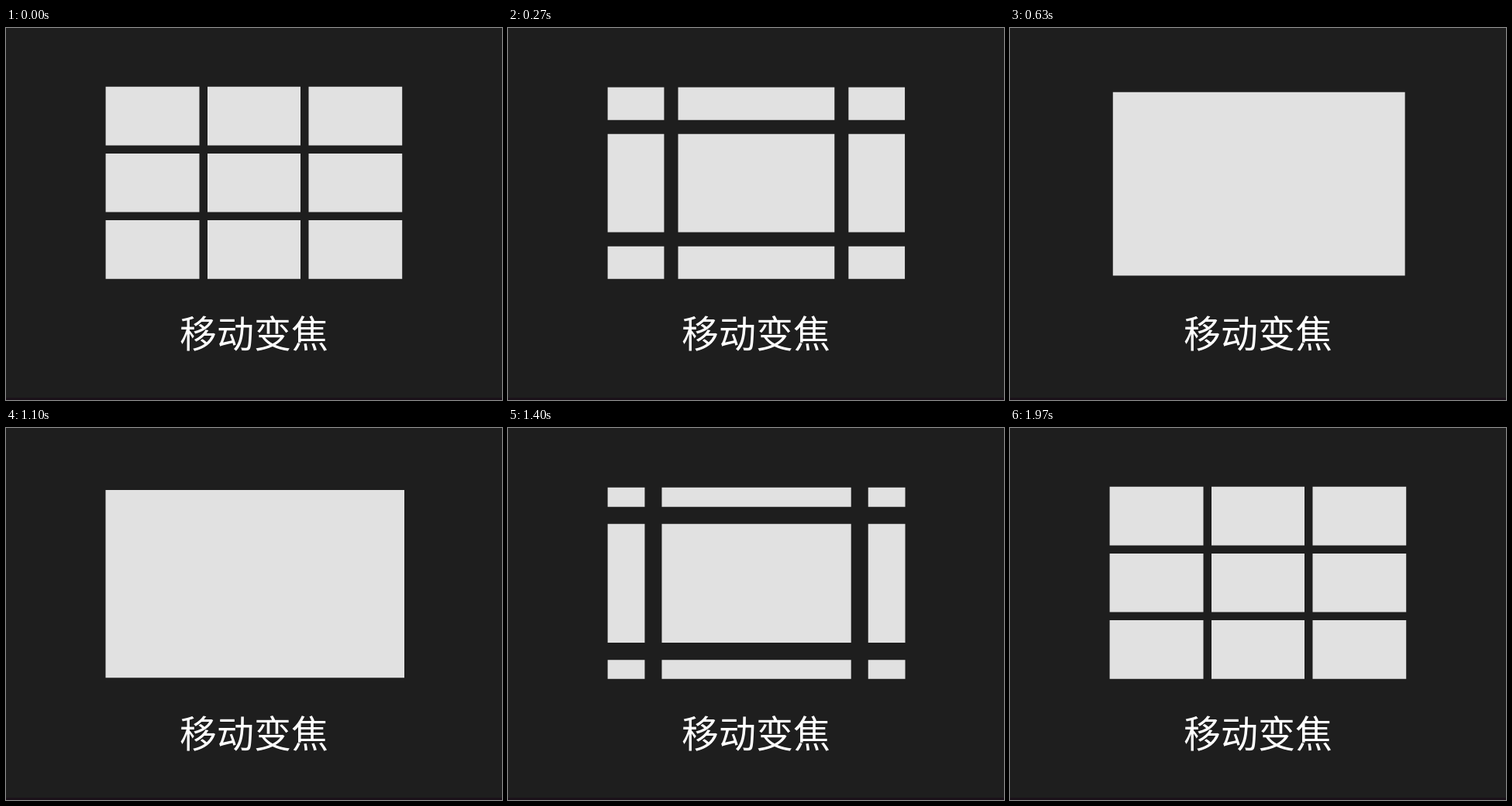
Recreate the animation shown at these times as an HTML page. Size 640 by 480 pixels, loop 2.01 s.

```html
<!DOCTYPE html>
<html lang="zh-CN">
<head>
<meta charset="utf-8">
<title>移动变焦</title>
<style>
  html, body { margin: 0; width: 100%; height: 100%; overflow: hidden; background: #1e1e1e; }
  svg { display: block; width: 640px; height: 480px; }
  text { font: 48px "Noto Sans CJK SC", "Noto Sans CJK", sans-serif; fill: #fff; text-anchor: middle; }
</style>
</head>
<body>
<svg viewBox="0 0 640 480">
  <rect width="640" height="480" fill="#1e1e1e"/>
  <rect y="477" width="640" height="3" fill="#1a1119"/>
  <path id="grid" fill="#e1e1e1"/>
  <text x="320" y="412">移动变焦</text>
</svg>
<script>
const LOOP = 2010;
const grid = document.getElementById('grid');
const clamp = x => Math.min(1, Math.max(0, x));

// Cubic bezier easing with control points (a, 0) and (b, 1)
function ease(x, a = 0.557, b = 0.073) {
  let lo = 0, hi = 1;
  for (let i = 0; i < 24; i++) {
    const s = (lo + hi) / 2, r = 1 - s;
    if (3 * r * r * s * a + 3 * r * s * s * b + s * s * s < x) lo = s;
    else hi = s;
  }
  return lo * lo * (3 - 2 * lo);
}

const zoom = t => t < 1000
  ? ease(clamp((t - 5) / 846))
  : 1 - ease(clamp((t - 1065) / 908));

// Spans along one axis: outer strips fill what the middle leaves free
const spans = (start, end, mid, size, gap) => [
  [start, mid - size / 2 - gap],
  [mid - size / 2, mid + size / 2],
  [mid + size / 2 + gap, end]
].filter(([from, to]) => to > from);

function draw(now) {
  const p = zoom(now % LOOP);
  const width = 120 + 266 * p;
  const gap = 10.5 + 24.7 * p;
  const cols = spans(128.6, 511.2 + 2.8 * p, 320 + 1.25 * p, width, gap);
  const rows = spans(75.7 + 2.5 * p, 323.7, 199.8 + 1.3 * p, width * 0.628, gap);
  grid.setAttribute('d', rows.flatMap(([top, bottom]) =>
    cols.map(([left, right]) => `M${left} ${top}H${right}V${bottom}H${left}Z`)).join(''));
}

const begin = performance.now();
function tick() {
  draw(performance.now() - begin);
  requestAnimationFrame(tick);
}
tick();
</script>
</body>
</html>
```
